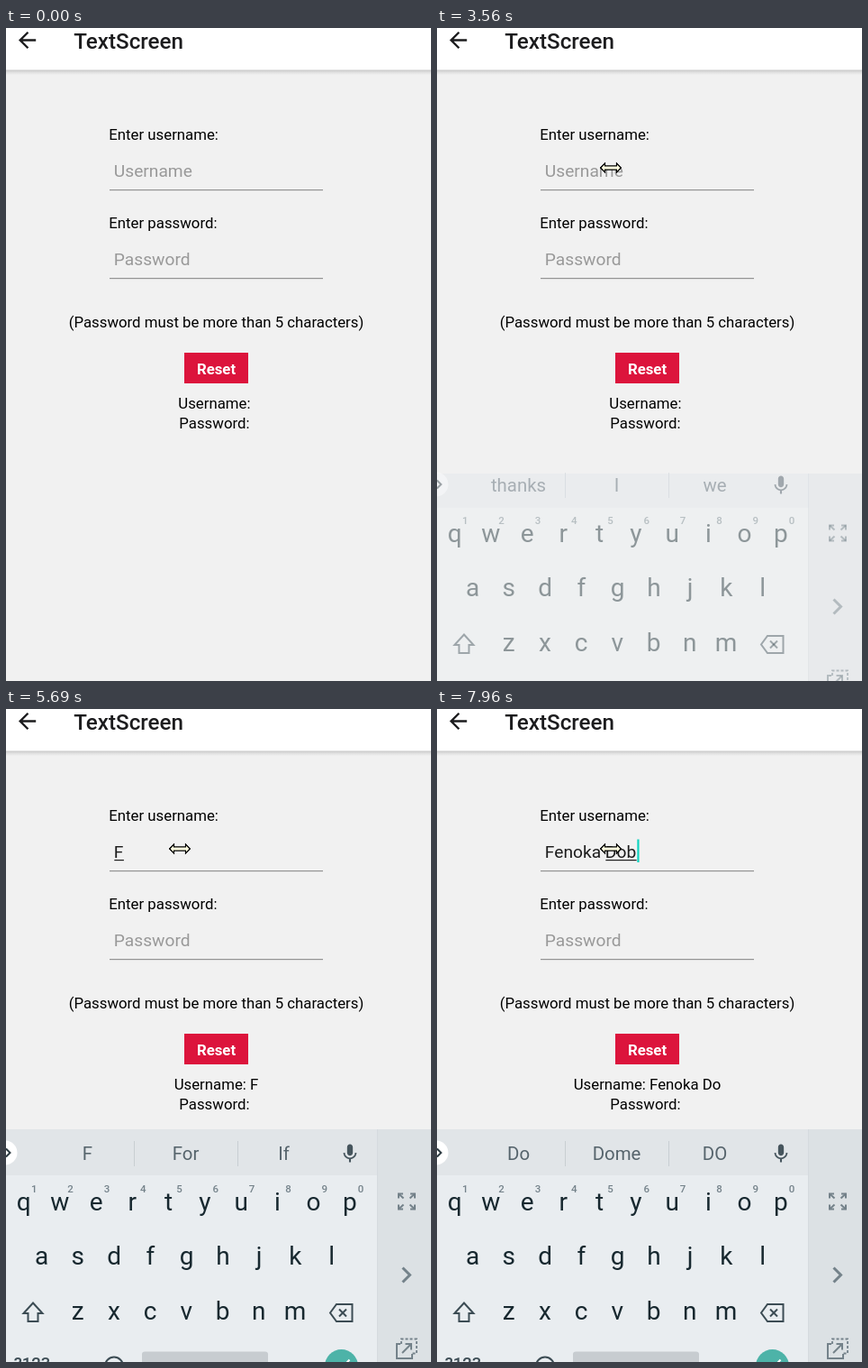
Recreate the animation shown at these times as an HTML page with a canvas. Size 472 by 724 pixels, loop 8000 ms.

```html
<!DOCTYPE html>
<html lang="en">
<head>
<meta charset="utf-8">
<title>TextScreen</title>
<style>
  html, body { margin: 0; width: 100%; height: 100%; overflow: hidden; background: #f1f1f1; }
  canvas { display: block; width: 472px; height: 724px; }
</style>
</head>
<body>
<canvas id="stage"></canvas>
<script>
const W = 472, H = 724, LOOP = 8000;
const canvas = document.getElementById('stage');
const ctx = canvas.getContext('2d');
const ratio = window.devicePixelRatio || 1;
canvas.width = W * ratio;
canvas.height = H * ratio;

const NAME = 'Fenoka Dob';
const FIELD_X = 119.8;
const FIELD_FONT = 19.2;

// Times at which each further letter shows up in the field and in the label
const TYPED = [5090, 5890, 6100, 6360, 6760, 6830, 6970, 7360, 7700, 7960];
const ECHOED = [5160, 5960, 6160, 6420, 6830, 6900, 7030, 7490, 7900];

const HINTS = [
  [0, 'thanks', 'I', 'we'],
  [5220, 'F', 'For', 'If'],
  [5960, 'Fe', 'Few', 'Feeling'],
  [6220, 'Fen', 'Den', 'Fencing'],
  [6560, 'Fence', 'Feno', 'Fend'],
  [6900, 'Fenoka', 'Fence', 'Fences'],
  [7030, 'is', 'and', 'have'],
  [7490, 'D', 'Do', 'Does'],
  [7900, 'Do', 'Dome', 'DO']
];

// [time, x, y] of the pointer
const POINTER = [
  [700, 414, 620], [770, 412, 619.5], [980, 396, 588], [1045, 334, 474],
  [1110, 255, 318], [1170, 193, 206], [1230, 173.5, 172], [1300, 175, 168],
  [1365, 183, 164], [1430, 192, 160], [1500, 199, 158], [1910, 198, 157],
  [1970, 195, 156], [2040, 193, 155]
];

// [time, drop, opacity] of the keyboard
const SLIDE = [[3560, 14, 0.45], [3630, 2, 0.9], [3700, 0.4, 0.97], [3770, 0, 1]];

const ICON = {
  back: new Path2D('M20 11H7.83l5.59-5.59L12 4l-8 8 8 8 1.41-1.41L7.83 13H20v-2z'),
  mic: new Path2D('M12 14c1.66 0 3-1.34 3-3V5c0-1.66-1.34-3-3-3S9 3.34 9 5v6c0 1.66 1.34 3 3 3z' +
    'm5.3-3c0 3-2.54 5.1-5.3 5.1S6.7 14 6.7 11H5c0 3.41 2.72 6.23 6 6.72V21h2v-3.28c3.28-.48 6-3.3 6-6.72h-1.7z')
};

const between = (t, a, b) => t >= a && t < b;
const passed = (times, t) => times.filter(at => at <= t).length;
const current = (steps, t) => steps[passed(steps.map(s => s[0]), t) - 1];

function font(size, weight = 400) {
  ctx.font = `${weight} ${size}px Roboto, sans-serif`;
}

function text(str, x, y, size, color, align = 'left', weight = 400) {
  font(size, weight);
  ctx.fillStyle = color;
  ctx.textAlign = align;
  ctx.fillText(str, x, y);
}

function rect(x, y, w, h, color) {
  ctx.fillStyle = color;
  ctx.fillRect(x, y, w, h);
}

function disc(x, y, r, color) {
  ctx.fillStyle = color;
  ctx.beginPath();
  ctx.arc(x, y, r, 0, Math.PI * 2);
  ctx.fill();
}

function ring(x, y, r, color, width) {
  ctx.strokeStyle = color;
  ctx.lineWidth = width;
  ctx.beginPath();
  ctx.arc(x, y, r, 0, Math.PI * 2);
  ctx.stroke();
}

function line(points, color, width, closed = false) {
  ctx.beginPath();
  points.forEach(([x, y]) => ctx.lineTo(x, y));
  if (closed) ctx.closePath();
  ctx.strokeStyle = color;
  ctx.lineWidth = width;
  ctx.stroke();
}

function icon(path, x, y, scale, color) {
  ctx.save();
  ctx.translate(x, y);
  ctx.scale(scale, scale);
  ctx.fillStyle = color;
  ctx.fill(path);
  ctx.restore();
}

function drawHeader() {
  const shade = ctx.createLinearGradient(0, 46, 0, 52);
  shade.addColorStop(0, '#bdbdbd');
  shade.addColorStop(0.4, '#dadada');
  shade.addColorStop(1, '#f1f1f1');
  rect(0, 46, W, 6, shade);
  rect(0, 0, W, 46.5, '#fff');
  icon(ICON.back, 9.2, -0.9, 1.2, '#1c1c1e');
  text('TextScreen', 75.2, 23, 24.2, '#1c1c1e', 'left', 500);
}

function drawForm(t) {
  const size = 16.8, mid = 233.5;
  text('Enter username:', 114.3, 124, size, '#000');
  text('Enter password:', 114.3, 222, size, '#000');
  rect(115, 179, 237, 1.2, '#939393');
  rect(115, 277, 237, 1.2, '#939393');
  text('Password', FIELD_X, 263, FIELD_FONT, '#999');
  text('(Password must be more than 5 characters)', mid, 332, size, '#000', 'center');
  rect(198, 360, 71, 34, '#dc143c');
  text('Reset', mid, 383.5, size, '#fff', 'center', 700);
  text('Username: ' + NAME.slice(0, passed(ECHOED, t)), mid, 421.5, size, '#000', 'center');
  text('Password: ', mid, 443.5, size, '#000', 'center');
}

function drawField(t) {
  const value = NAME.slice(0, passed(TYPED, t));
  if (value) text(value, FIELD_X, 165, FIELD_FONT, '#1c1c1c');
  else text('Username', FIELD_X, 165, FIELD_FONT, '#999');

  font(FIELD_FONT);
  const end = FIELD_X + ctx.measureText(value).width;
  const word = value.slice(value.lastIndexOf(' ') + 1);
  const wordWidth = ctx.measureText(word).width;
  if (word) rect(end - wordWidth + 0.5, 167, wordWidth, 1.2, '#1c1c1c');

  const blinkedOff = between(t, 4160, 4700) || between(t, 5690, 5890);
  if (t >= 3700 && !blinkedOff) rect(end + 1.2, 144.5, 2.2, 25.5, '#0fd3c0');
}

function drawKeys() {
  const ink = '#17282f', tone = '#3c4c54';
  const rows = [['qwertyuiop', 19.6, 555.5], ['asdfghjkl', 39.6, 615.5], ['zxcvbnm', 79.6, 676.5]];
  for (const [letters, x, y] of rows) {
    [...letters].forEach((ch, i) => text(ch, x + 40.25 * i, y, 28, ink, 'center'));
  }
  [...'1234567890'].forEach((ch, i) =>
    text(ch, 31.3 + 40.3 * i, 536, 11.5, '#74828a', 'center', 500));

  line([[30, 658.5], [40.5, 670], [35.5, 670], [35.5, 679], [24.5, 679], [24.5, 670], [19.5, 670]], tone, 2, true);
  line([[360, 669.5], [367, 660], [384.5, 660], [384.5, 679], [367, 679]], tone, 2, true);
  line([[370, 665.5], [378, 673.5]], tone, 2);
  line([[378, 665.5], [370, 673.5]], tone, 2);

  text('?123', 29, 732, 18.5, tone, 'center', 500);
  ring(120, 728.5, 10, tone, 2);
  ctx.fillStyle = '#c7ccd0';
  ctx.beginPath();
  ctx.roundRect(151, 712.5, 140, 30, 3);
  ctx.fill();
  disc(372.5, 728.5, 18.5, '#4db3a8');
  line([[364, 728], [370, 734], [381.5, 721.5]], '#fff', 2.2);
}

function drawSideIcons() {
  const tone = '#74828a';
  for (const sx of [-1, 1]) for (const sy of [-1, 1]) {
    const at = (x, y) => [445 + sx * x, 546 + sy * y];
    line([at(4, 8.5), at(9, 8.5), at(9, 3.5)], tone, 2);
    line([at(9, 8.5), at(3.5, 3.5)], tone, 2);
  }
  line([[440.5, 619.5], [448.5, 627.5], [440.5, 635.5]], tone, 3);
  line([[438, 704], [434, 704], [434, 720], [451, 720], [451, 715]], tone, 2);
  ctx.setLineDash([3, 2]);
  line([[439, 704], [439, 698.5], [456, 698.5], [456, 714.5], [451, 714.5]], tone, 1.8);
  ctx.setLineDash([]);
  line([[440, 714], [449.5, 704.5]], tone, 2);
  line([[443.5, 704], [450, 704], [450, 710.5]], tone, 2);
}

function drawKeyboard(t) {
  if (t < SLIDE[0][0]) return;
  const [, drop, opacity] = current(SLIDE, t);
  const tone = '#56646c';
  ctx.save();
  ctx.globalAlpha = opacity;
  ctx.translate(0, drop);
  rect(0, 466 + drop, 413, 52 - drop, '#e1e5e8');
  rect(0, 517, 413, 220, '#e9edf0');
  rect(413, 466 + drop, 59, 270, '#dce1e4');
  rect(412, 466 + drop, 1, 270, '#d5dade');

  disc(-1, 492, 13.5, '#fff');
  line([[0, 487.5], [4.5, 492], [0, 496.5]], '#2c3a41', 2);
  current(HINTS, t).slice(1).forEach((word, i) =>
    text(word, 90.5 + 109 * i, 500, 20.4, tone, 'center'));
  rect(142, 479, 1, 28, '#c8ced2');
  rect(257, 479, 1, 28, '#c8ced2');
  icon(ICON.mic, 369.4, 480.5, 1.05, '#46555d');

  drawKeys();
  drawSideIcons();
  ctx.restore();
}

function drawPointer(t) {
  if (t < POINTER[0][0]) return;
  const [, x, y] = current(POINTER, t);
  ctx.save();
  ctx.translate(x, y);
  if (between(t, 2440, 2580)) {
    ring(0, 0, 14, '#000', 1);
    ring(0, 0, 13, '#fff', 1);
  }
  const half = [[-6.5, -5], [-6.5, -2], [6.5, -2], [6.5, -5], [11.3, 0]];
  const shape = [[-11.3, 0], ...half, [6.5, 5], [6.5, 2], [-6.5, 2], [-6.5, 5]];
  line(shape, '#000', 1.1, true);
  ctx.fillStyle = '#fffee0';
  ctx.fill();
  line(shape, '#000', 1.1, true);
  ctx.restore();
}

function draw(t) {
  ctx.setTransform(ratio, 0, 0, ratio, 0, 0);
  rect(0, 0, W, H, '#f1f1f1');
  drawHeader();
  drawForm(t);
  drawField(t);
  drawKeyboard(t);
  drawPointer(t);
}

const start = performance.now();
function tick() {
  draw((performance.now() - start) % LOOP);
  requestAnimationFrame(tick);
}
tick();
</script>
</body>
</html>
```
